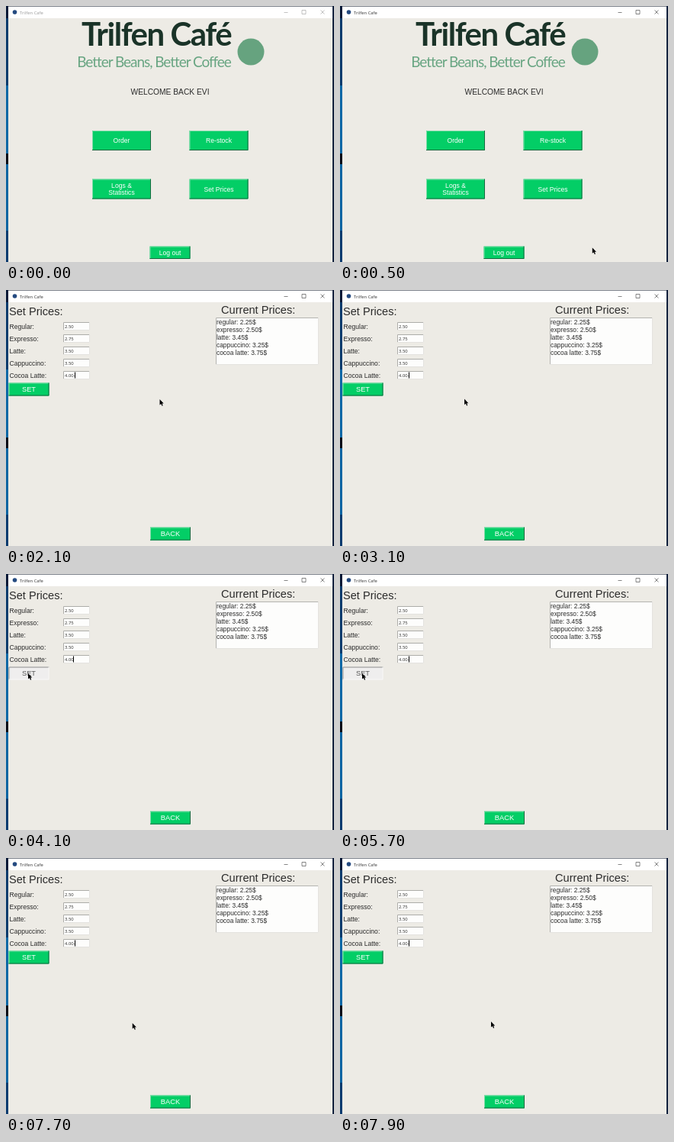
These frames come from a looping animation (430 by 335 pixels, 8000 ms). An HTML page:

```html
<!DOCTYPE html>
<html lang="en">
<head>
<meta charset="utf-8">
<title>Trilfen Cafe</title>
<style>
  html, body { margin: 0; width: 100%; height: 100%; overflow: hidden; background: #edebe5; }
  svg { display: block; width: 430px; height: 335px; }
  text { font-family: "Liberation Sans", Arial, sans-serif; fill: #2b2b2b; white-space: pre; }
  .ui { font-family: "Open Sans", "Noto Sans", sans-serif; font-size: 5.85px; }
  .brand { font-family: Lato, sans-serif; }
</style>
</head>
<body>
<svg id="stage" viewBox="0 0 430 335" xmlns="http://www.w3.org/2000/svg"></svg>
<script>
const LOOP = 8000, STEP = 100;
const GREEN = "#03ce66";

const rect = (x, y, w, h, fill, extra = "") =>
  `<rect x="${x}" y="${y}" width="${w}" height="${h}" fill="${fill}" ${extra}/>`;
const text = (x, y, size, str, extra = "") =>
  `<text x="${x}" y="${y}" font-size="${size}" ${extra}>${str}</text>`;
const ui = (x, y, str, extra = "") =>
  `<text class="ui" x="${x}" y="${y}" ${extra}>${str}</text>`;
const line = (d, color, width = 1) =>
  `<path d="${d}" fill="none" stroke="${color}" stroke-width="${width}"/>`;
const group = (id, body) => `<g id="${id}">${body}</g>`;
const MID = 'text-anchor="middle"';

// Two-tone frame: one colour on the upper left, the other on the lower right
const bevel = (x, y, w, h, upper, lower) =>
  line(`M${x + .5} ${y + h}V${y + .5}H${x + w}`, upper) +
  line(`M${x} ${y + h - .5}H${x + w - .5}V${y}`, lower);

function button(x, y, w, h, size, lines, pressed = false) {
  const cy = y + h / 2 + size * .36 - (lines.length - 1) * 4.6;
  const labels = lines.map((s, i) => text(x + w / 2, cy + i * 9.2, size, s,
    `${MID} style="fill:${pressed ? "#555" : "#fff"}"`)).join("");
  const edge = pressed ? ["#8c8c8c", "#f8f8f6"] : ["#7fdda9", "#156b40"];
  return rect(x, y, w, h, pressed ? "#efeeee" : GREEN) + bevel(x, y, w, h, ...edge) + labels;
}

function pressable(id, ...args) {
  return group(id + "Up", button(...args)) + group(id + "Down", button(...args, true));
}

function desktop() {
  const bands = [[0, 16, "#071a38"], [16, 88, "#0a3c6e"], [104, 89, "#0d68a6"],
    [193, 14, "#060a18"], [207, 87, "#0c65a3"], [294, 41, "#0a3c70"]];
  return bands.map(([y, h, c]) => rect(0, y, 3, h, c)).join("") +
    rect(428, 0, 2, 335, "#14233f") + rect(3, 0, 425, 335, "#edebe5");
}

function titleBar() {
  return rect(3, 0, 425, 16, "#fff") + rect(3, 0, 425, 1, "#7d828c") +
    '<circle cx="11.5" cy="8" r="2.8" fill="#244a80"/>' +
    group("chrome", ui(18, 10.6, "Trilfen Cafe", 'style="fill:currentColor"') +
      line("M364.5 8.5H369.5M388 5.5H393V10.5H388ZM412.5 5.5L417.5 10.5M417.5 5.5L412.5 10.5",
        "currentColor", .6));
}

function homePage() {
  return text(197, 52, 42, "Trilfen Café",
      `class="brand" font-weight="700" letter-spacing="-1.5" ${MID} style="fill:#1a3328"`) +
    text(194, 79.5, 19, "Better Beans, Better Coffee",
      `class="brand" letter-spacing="-1.05" ${MID} style="fill:#68a582"`) +
    '<circle cx="321" cy="60" r="17.5" fill="#66a37f"/>' +
    text(215, 116, 10.25, "WELCOME BACK EVI", MID) +
    button(113, 163, 77, 26, 8.6, ["Order"]) +
    button(240.5, 163, 77, 26, 8.6, ["Re-stock"]) +
    button(113, 226.5, 77, 26, 8.6, ["Logs &amp;", "Statistics"]) +
    pressable("prices", 240.5, 226.5, 77, 26, 8.6, ["Set Prices"]) +
    button(188.5, 314.5, 53, 16.5, 8.6, ["Log out"]);
}

function pricePage() {
  const fields = [["Regular:", "2.50"], ["Expresso:", "2.75"], ["Latte:", "3.50"],
    ["Cappuccino:", "3.50"], ["Cocoa Latte:", "4.00"]];
  const rows = fields.map(([label, value], i) => {
    const y = 42 + i * 16;
    return text(4.5, y + 8.7, 8.6, label) + rect(75, y, 35, 11, "#fdfdfc") +
      bevel(75, y, 35, 11, "#adada9", "#e4e3df") + ui(77, y + 8, value);
  }).join("");
  const items = ["regular: 2.25$", "expresso: 2.50$", "latte: 3.45$",
    "cappuccino: 3.25$", "cocoa latte: 3.75$"];
  return text(4, 33, 14.6, "Set Prices:") + text(282, 31, 14.6, "Current Prices:") +
    rows + group("dash", ui(88.6, 114, "-")) + group("caret", rect(0, 107.5, 1, 8, "#000")) +
    rect(275, 36, 135, 62, "#fdfdfc") + bevel(275, 36, 135, 62, "#b4b4b0", "#e4e3df") +
    items.map((s, i) => text(276, 44.8 + i * 10.05, 8.4, s)).join("") +
    pressable("set", 3.5, 121.5, 53, 17, 9.3, ["SET"]) +
    button(189, 310.5, 53, 17, 9.3, ["BACK"]);
}

function dialog() {
  const choice = (id, x, label, edge) =>
    rect(x + .5, 208.5, 38, 11, "#e1e1e1", `id="${id}" stroke="${edge}"`) +
    ui(x + 19.5, 216.3, label, MID);
  return rect(75, 146, 166, 82, "#000", 'opacity=".28" filter="url(#soft)"') +
    rect(76.5, 145.5, 162, 79, "#fefefe", 'stroke="#9a9a98"') +
    rect(77, 204, 161, 20, "#f0f0f0") +
    '<circle cx="85.5" cy="153" r="2.8" fill="#244a80"/>' + ui(92, 155.3, "Inventory") +
    line("M227.7 150.7L232.3 155.3M232.3 150.7L227.7 155.3", "#bbb", .7) +
    '<circle cx="96" cy="182" r="8" fill="#0b68b4"/>' +
    ui(96, 186.3, "?", `${MID} style="fill:#fff;font-size:12px;font-weight:600"`) +
    ui(109, 181, "Are you sure you want to add these items") +
    ui(111, 187.6, "to the inventory") +
    choice("yes", 147, "Yes", "#5b98c8") +
    rect(149, 210.5, 35, 7, "none", 'stroke="#789" stroke-width=".5" stroke-dasharray=".8 .8"') +
    choice("no", 191, "No", "#bdbdbd");
}

const stage = document.getElementById("stage");
stage.innerHTML =
  '<defs><filter id="soft"><feGaussianBlur stdDeviation="2"/></filter></defs>' +
  desktop() + titleBar() + group("home", homePage()) + group("form", pricePage()) +
  group("dialog", dialog()) +
  group("pointer", '<path d="M0 0V7.6L1.8 6 3 8.8 4.2 8.3 3.1 5.6H5.3Z" fill="#000" ' +
    'stroke="#fff" stroke-width=".5" paint-order="stroke"/>');

const el = id => document.getElementById(id);
const show = (id, on) => el(id).setAttribute("visibility", on ? "inherit" : "hidden");
const within = (t, a, b) => t >= a && t < b;

// Pointer stops: time, x, y
const stops = [[300, 338, 335], [1000, 301.5, 240], [1800, 301.5, 240],
  [2100, 201.5, 143], [2800, 210, 147], [3700, 29, 130], [5700, 29, 130],
  [6100, 165.7, 216], [7700, 165.7, 216], [7900, 198, 214]];

function pointerAt(t) {
  const i = stops.findIndex(s => s[0] > t);
  if (i < 0) return stops[stops.length - 1].slice(1);
  if (i === 0) return stops[0].slice(1);
  const [t0, x0, y0] = stops[i - 1], [t1, x1, y1] = stops[i];
  const p = (t - t0) / (t1 - t0), e = p * p * (3 - 2 * p);
  return [x0 + (x1 - x0) * e, y0 + (y1 - y0) * e];
}

function press(id, on) {
  show(id + "Up", !on);
  show(id + "Down", on);
}

function draw(t) {
  const home = t < 1900, asking = within(t, 5800, 7700);
  const dash = !within(t, 3300, 5000);
  show("home", home);
  show("form", !home);
  show("dialog", asking);
  press("prices", within(t, 1100, 1900));
  press("set", within(t, 3900, 5800));
  show("dash", dash);
  show("caret", !asking);
  el("caret").setAttribute("transform", `translate(${dash ? 90 : 88} 0)`);
  el("chrome").setAttribute("color", t < 500 || asking ? "#999" : "#333");
  el("yes").setAttribute("fill", within(t, 6000, 7700) ? "#bdd8ec" : "#e1e1e1");
  show("pointer", t >= 300);
  el("pointer").setAttribute("transform", `translate(${pointerAt(t).join(" ")})`);
}

const start = performance.now();
function tick() {
  draw(Math.floor(((performance.now() - start) % LOOP) / STEP) * STEP);
  requestAnimationFrame(tick);
}
tick();
</script>
</body>
</html>
```
